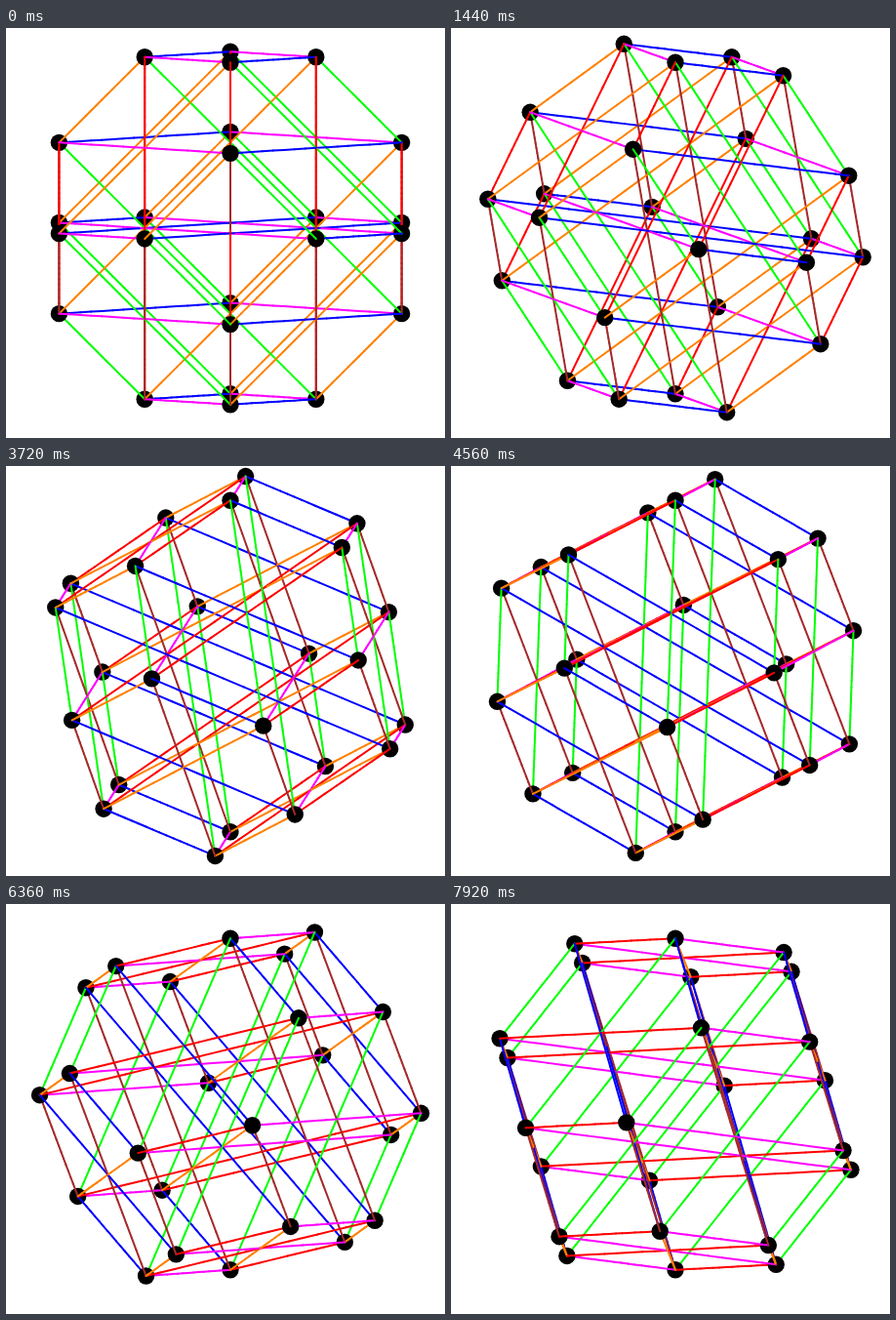
An HTML page with a canvas for the animation above (8 s loop, 450 by 420 pixels).

```html
<!DOCTYPE html>
<html lang="en">
<head>
<meta charset="utf-8">
<title>Rotating permutation graph</title>
<style>
  html, body { margin: 0; width: 100%; height: 100%; overflow: hidden; background: #fff; }
  canvas { display: block; }
</style>
</head>
<body>
<canvas id="stage" width="450" height="420"></canvas>
<script>
const ctx = document.getElementById('stage').getContext('2d');
const LOOP = 8000, STEP = 120, TURN = 1.8 * Math.PI / 180;
const CENTER = [230, 205], SCALE = 87.8, TILT = 0.0625;
const DOT = 8.7, LINE = 2, PIECES = 16;

// Each edge colour belongs to one mirror, given by its normal.
const MIRRORS = [
  ['#a52a2a', [0, 1, -1]],
  ['#ff8000', [1, -1, 0]],
  ['#ff00ff', [1, 0, 1]],
  ['#00ff00', [1, 1, 0]],
  ['#ff0000', [0, 1, 1]],
  ['#0000ff', [1, 0, -1]]
];

const dot = (a, b) => a[0] * b[0] + a[1] * b[1] + a[2] * b[2];
const cross = (a, b) => [
  a[1] * b[2] - a[2] * b[1],
  a[2] * b[0] - a[0] * b[2],
  a[0] * b[1] - a[1] * b[0]
];
const mix = (a, b, k) => a.map((v, i) => v + (b[i] - v) * k);

// Vertices: all orders and signs of (0, 1, 2).
const range = [-2, -1, 0, 1, 2];
const vertices = range.flatMap(x => range.flatMap(y => range.map(z => [x, y, z])))
  .filter(v => v.map(Math.abs).sort().join('') === '012');

const edges = MIRRORS.flatMap(([color, n]) => vertices
  .filter(v => dot(v, n) < 0)
  .map(v => ({ color, from: v, to: v.map((c, i) => c - dot(v, n) * n[i]) })));

const AXIS = [0, -2, 1].map(c => c / Math.sqrt(5));

function project(v, angle) {
  const cos = Math.cos(angle), sin = Math.sin(angle);
  const along = dot(v, AXIS) * (1 - cos), side = cross(AXIS, v);
  const [x, y, z] = v.map((c, i) => c * cos + side[i] * sin + AXIS[i] * along);
  const ct = Math.cos(TILT), st = Math.sin(TILT);
  return [
    CENTER[0] + SCALE * x,
    CENTER[1] + SCALE * (y * ct + z * st),
    SCALE * (z * ct - y * st)
  ];
}

function draw(angle) {
  const items = vertices.map(v => {
    const p = project(v, angle);
    return { p, depth: p[2] };
  });
  for (const { color, from, to } of edges) {
    const a = project(from, angle), b = project(to, angle);
    for (let i = 0; i < PIECES; i++) {
      const p = mix(a, b, i / PIECES), q = mix(a, b, (i + 1) / PIECES);
      items.push({ p, q, color, depth: (p[2] + q[2]) / 2 });
    }
  }
  // Far parts first, so near ones cover them.
  items.sort((a, b) => a.depth - b.depth);

  ctx.fillStyle = '#fff';
  ctx.fillRect(0, 0, 450, 420);
  ctx.fillStyle = '#000';
  ctx.lineWidth = LINE;
  ctx.lineCap = 'round';
  for (const { p, q, color } of items) {
    ctx.beginPath();
    if (q) {
      ctx.strokeStyle = color;
      ctx.moveTo(p[0], p[1]);
      ctx.lineTo(q[0], q[1]);
      ctx.stroke();
    } else {
      ctx.arc(p[0], p[1], DOT, 0, 2 * Math.PI);
      ctx.fill();
    }
  }
}

const start = performance.now();
function tick() {
  const time = (performance.now() - start) % LOOP;
  draw(Math.floor(time / STEP) * TURN);
  requestAnimationFrame(tick);
}
tick();
</script>
</body>
</html>
```
